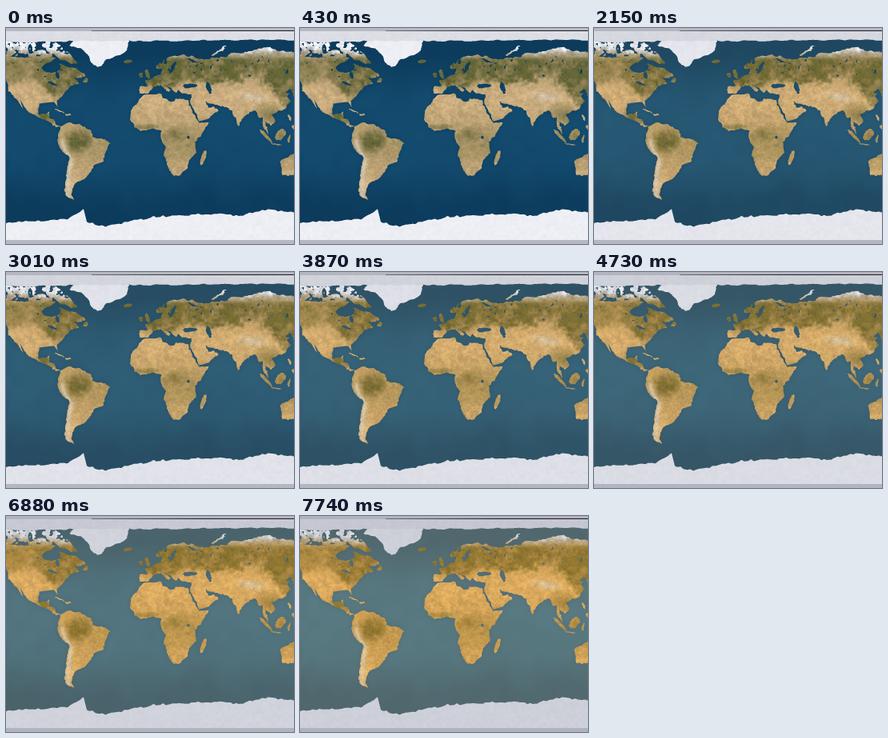
A matplotlib script that plays this animation: 360x270 px, repeating every 8000 ms.

```python
import matplotlib.pyplot as plt
import numpy as np
from matplotlib.animation import FuncAnimation
from matplotlib.path import Path

W, H, SS = 360, 270, 3
SCALE = 1.435            # pixels per degree
LOOP, INTERVAL, STEP = 8000, 20, 430
LAST = LOOP // STEP
rng = np.random.default_rng(12)

# Each tone: colour at the start, colour at the end of the warming.
TONES = {
    "deep": ((12, 59, 92), (80, 103, 109)),
    "sea": ((20, 77, 113), (89, 123, 131)),
    "sand": ((203, 173, 127), (221, 171, 94)),
    "olive": ((97, 98, 53), (141, 115, 46)),
    "tundra": ((142, 136, 114), (165, 148, 112)),
    "pale": ((206, 191, 166), (213, 192, 154)),
    "ice": ((239, 240, 246), (207, 209, 218)),
    "rim": ((182, 184, 194), (176, 179, 189)),
    "ink": ((24, 24, 28), (24, 24, 28)),
}

# Key points of the coasts as lon, lat; noise adds the small bays.
NORTH_AMERICA = [
    (-135, 70), (-110, 68), (-95, 70), (-82, 68), (-87, 64), (-78, 62.3),
    (-70, 60), (-64, 60), (-56, 52.5), (-66, 50), (-61, 46), (-70, 43),
    (-75.5, 36), (-81, 31), (-80.3, 25.3), (-83.5, 30), (-97, 28.5),
    (-96.5, 19), (-91, 18.5), (-87, 21.3), (-88, 16), (-83.5, 14.5),
    (-82.5, 10), (-77.5, 8.5), (-82, 7.7), (-87, 12), (-95, 16), (-105, 20),
    (-113, 31), (-110, 23.5), (-117, 32.5), (-124, 40), (-124, 48), (-135, 57)]
SOUTH_AMERICA = [
    (-77.5, 8.5), (-72, 12), (-61, 10), (-51, 4.5), (-49, -1), (-40, -3),
    (-35, -6), (-39, -14), (-41, -22), (-48.5, -26), (-53, -33.5),
    (-57.5, -37.5), (-65, -41), (-67, -46), (-69, -51), (-65.5, -55),
    (-71, -54.5), (-75, -48), (-73.5, -38), (-70.3, -18), (-76.5, -13),
    (-81, -5), (-80, 1)]
AFRICA = [
    (-6, 35.5), (10, 37.3), (11, 33.5), (19, 30.3), (22, 32.7), (33, 31),
    (37, 20.5), (43.5, 11.3), (51, 12), (47, 4), (39.5, -5), (40.5, -15),
    (35, -20), (32.5, -28), (27, -34), (20, -34.8), (18, -32), (14, -22),
    (12, -17), (13.5, -10), (9, -1), (9.5, 4), (4.5, 6.3), (-8, 4.5),
    (-13, 8.5), (-17.3, 15), (-16.5, 22), (-10, 30)]
ARABIA = [
    (35, 31), (35.2, 28), (39.5, 21), (43.5, 12.8), (52, 16), (59.8, 22.5),
    (56, 25.5), (51, 24.5), (48, 30), (44, 36), (36, 37)]
EURASIA = [
    (-9, 43), (-9, 37), (-2, 37), (3.5, 43), (9, 44), (16, 38.3), (18, 40),
    (13, 45), (19.5, 41), (22.5, 36.8), (24, 40.5), (27, 37), (36, 36.5),
    (44, 33), (48, 30), (57, 27), (67, 25), (72.5, 20), (77.5, 8), (80.2, 15),
    (88, 22), (92, 22), (94.5, 16), (98, 16), (98.5, 8), (103.5, 1.3),
    (103, 5), (100, 13), (105, 9), (109, 12), (106, 19), (117, 23.5),
    (122, 30), (119.5, 35), (122, 37), (118, 39), (122, 40.5), (126, 34.5),
    (129.3, 36), (128, 40), (135, 44), (135, 72), (113, 74), (104, 77.5),
    (80, 72.8), (70, 72.5), (67, 68.8), (45, 67), (30, 70.5), (19, 70),
    (5.5, 61.5), (6, 58.3), (11, 59), (9, 54), (-1.5, 49), (-4.7, 48.3),
    (-1.5, 44)]
AUSTRALIA = [
    (113.5, -22), (115.5, -34.5), (123.5, -34), (135, -35), (135, -12),
    (130, -12.5), (122.5, -17.5)]
GREENLAND = [
    (-70, 79), (-60, 76), (-53, 70), (-52, 65), (-46, 60.7), (-43, 61),
    (-39, 66), (-25, 71), (-20, 76), (-18, 84), (-64, 84)]

# Ellipses: lon, lat, half length, half width, angle.
ISLES = [
    (-2.5, 54, 4.2, 1.6, 110), (-8, 53.3, 1.9, 1.5, 60),     # Britain, Ireland
    (-19, 65, 3.4, 1.2, 0), (46.8, -19, 6.6, 2, 72),         # Iceland, Madagascar
    (101, 0, 8, 1.5, -47), (110, -7.3, 5, .7, -8),           # Sumatra, Java
    (113.7, 1, 5.2, 3.6, 45), (121, -2, 3.5, 1, 80),         # Borneo, Sulawesi
    (121.5, 16, 3, 1.1, 110), (125, 7.8, 1.9, 1.6, 0),       # Philippines
    (-79, 21.7, 5, .6, -18), (-71, 19, 2.6, .8, 0),          # Antilles
    (-56, 48.7, 2.6, 1.8, 30), (-74, 68.5, 11, 3, -25),      # Newfoundland, Baffin
    (60, 74, 8, .9, 33)]                                     # Novaya Zemlya
WATERS = [
    (-86, 59.5, 8, 4.5, 0), (-80.5, 53, 3, 1.6, 90),         # Hudson Bay
    (20, 60, 6, 1.7, 65), (37, 65.8, 4, .9, -30),            # Baltic, White Sea
    (34.5, 43.3, 6.3, 1.7, 0), (51, 42, 5.3, 1.8, 105),      # Black, Caspian
    (-85, 45.8, 4.5, 1, -25), (33, -1, 1.5, 1.3, 0)]         # Great Lakes, Victoria
GREENS = [
    (-62, -4, 14, 12, 0), (22, 0, 16, 9, 0), (-3, 8, 14, 3, 0),
    (103, 18, 13, 10, 0), (112, 0, 20, 9, 0), (-90, 16, 9, 4, -20)]

# Ice shore in pixels, with the peninsula near x = 97.
SHORE_X = [0, 60, 78, 97, 101, 125, 185, 260, 290, 325, 360]
SHORE_Y = [243, 240, 238, 227, 243, 248, 236, 232, 235, 227, 231]


def noise(cell, h=H, w=W):
    """Smooth value noise in -1..1."""
    grid = rng.uniform(-1, 1, (h // cell + 2, w // cell + 2))
    y, x = np.arange(h) / cell, np.arange(w) / cell
    i, j = y.astype(int), x.astype(int)
    fy, fx = ((f * f * (3 - 2 * f)) for f in (y - i, x - j))
    rows = grid[i] * (1 - fy[:, None]) + grid[i + 1] * fy[:, None]
    return rows[:, j] * (1 - fx) + rows[:, j + 1] * fx


def shrink(a):
    return a.astype(float).reshape(H, SS, W, SS).mean(axis=(1, 3))


def blur(a, r):
    for axis in (0, 1):
        a = sum(np.roll(a, k, axis) for k in range(-r, r + 1)) / (2 * r + 1)
    return a


def ramp(v, centre, width):
    """Soft step from 0 to 1."""
    return 1 / (1 + np.exp(-(v - centre) / width))


def bump(v, centre, width):
    return np.exp(-((v - centre) / width) ** 2)


def oval(x, y, e):
    """Squared distance from an ellipse centre; 1 on its edge."""
    cx, cy, a, b, angle = e
    c, s = np.cos(np.radians(angle)), np.sin(np.radians(angle))
    dx, dy = x - cx, y - cy
    return ((dx * c + dy * s) / a) ** 2 + ((dy * c - dx * s) / b) ** 2


def inside(shape):
    pts = np.c_[fine_lon.ravel(), fine_lat.ravel()]
    return Path(shape).contains_points(pts).reshape(fine_lon.shape)


def any_oval(ovals):
    return np.any([oval(fine_lon, fine_lat, e) < 1 for e in ovals], axis=0)


def wobble():
    return .5 * noise(7, H * SS, W * SS) + .6 * noise(17, H * SS, W * SS)


fy, fx = (np.mgrid[0:H * SS, 0:W * SS] + .5) / SS
fine_lon = (fx - W / 2) / SCALE + wobble()
fine_lat = (H / 2 - fy) / SCALE + wobble()
py, px = np.mgrid[0:H, 0:W] + .5
lon, lat = (px - W / 2) / SCALE, (H / 2 - py) / SCALE

rough = .45 * noise(14) + .4 * noise(6) + .3 * noise(3)
grain = .5 * noise(5) + .5 * noise(2) + .3 * rng.uniform(-1, 1, (H, W))
swell = .6 * noise(40) + .4 * noise(15)
specks = noise(13, H * SS, W * SS) + .6 * noise(6, H * SS, W * SS)

# Land, water and ice coverage; the far north breaks up into random islands.
continents = [NORTH_AMERICA, SOUTH_AMERICA, AFRICA, ARABIA, EURASIA, AUSTRALIA]
solid = np.any([inside(c) for c in continents], axis=0) | any_oval(ISLES)
arctic = (fine_lon < -68 - 1.2 * (fine_lat - 70)) & (fine_lat > 69)
solid |= arctic & (specks > -.2)
ponds = (fine_lat > 52) & (fine_lat < 69) & (specks > .95)
land = shrink(solid & ~any_oval(WATERS) & ~ponds)
greenland = shrink(inside(GREENLAND))

shore = np.interp(fx[0], SHORE_X, SHORE_Y) + 1.2 * noise(12, 1, W * SS)[0]
edge = 16 + np.cos(fx[0] / 115) + noise(20, 1, W * SS)[0]
south, north = shrink(fy > shore), shrink(fy < edge)
ice = np.maximum.reduce([south, north, greenland])
rim = ((py < 4) | (py > 265)).astype(float)
line = ((py > 3) & (py < 4) & (px > 107)) * np.clip(.45 + (px - 107) / 280, 0, .95)

# Vegetation: a northern belt reaching further south on the wet coasts.
belt = 48 - 16 * bump(lon, -80, 14) - 6 * bump(lon, 10, 18) - 23 * bump(lon, 122, 14)
green = .9 * ramp(lat + 6 * rough, belt, 1.8) * ramp(-lat, -69, 1.2)
green *= 1 - .4 * bump(lon, -112, 14)
green = np.maximum(green, .35 * bump(lat, -8, 20))
for e in GREENS:
    strength = .9 if e[0] < -50 else .55
    green = np.maximum(green, strength * np.exp(-oval(lon, lat, e) ** 1.5))
green *= 1 + .7 * rough

tundra = .75 * ramp(lat, 69, 1)
andes = np.interp(lat, [-50, -20, -10, 5], [-72, -69, -75.5, -78])
highland = .95 * bump(lon, andes, 2.4) * ramp(-lat, 2, 2)
highland += .75 * np.exp(-oval(lon, lat, (89, 34, 12, 4, -8)) ** 1.5)
snow = ramp(lat + 5 * rough, 74, 1.5)


def paint(k):
    """Whole map with the tones of the start (k=0) or the end (k=1)."""
    tone = {n: np.array(c[k], float) for n, c in TONES.items()}

    def over(base, name, alpha):
        return base + (tone[name] - base) * np.clip(alpha, 0, 1)[..., None]

    img = np.tile(tone["deep"], (H, W, 1))
    img = over(img, "sea", .85 * np.exp(-((lat - 5) / 52) ** 4) + .2 * swell)
    img = over(img, "deep", .7 * blur(land, 5))

    ground = np.tile(tone["sand"], (H, W, 1))
    for name, cover in (("olive", green), ("tundra", tundra),
                        ("pale", highland), ("ice", snow)):
        ground = over(ground, name, cover)
    ground *= (1 + .11 * grain + .07 * rough)[..., None]

    img += (ground - img) * land[..., None]
    img = over(img, "ice", ice)
    img = over(img, "rim", .3 * north)
    img *= (1 + .02 * ice * (grain - .3))[..., None]
    img = over(img, "rim", rim)
    img = over(img, "ink", line)
    return np.clip(img, 0, 255)


cool, warm = paint(0), paint(1)


def scene(step):
    heat = (step / LAST) ** .85
    return np.round(cool + (warm - cool) * heat).astype(np.uint8)


fig = plt.figure(figsize=(W / 100, H / 100), dpi=100)
ax = fig.add_axes([0, 0, 1, 1])
ax.axis("off")
view = ax.imshow(scene(0), interpolation="nearest", aspect="auto")


def update(i):
    view.set_data(scene(i * INTERVAL // STEP))
    return [view]


anim = FuncAnimation(fig, update, frames=LOOP // INTERVAL, interval=INTERVAL,
                     repeat=True, repeat_delay=0)
plt.show()
```
